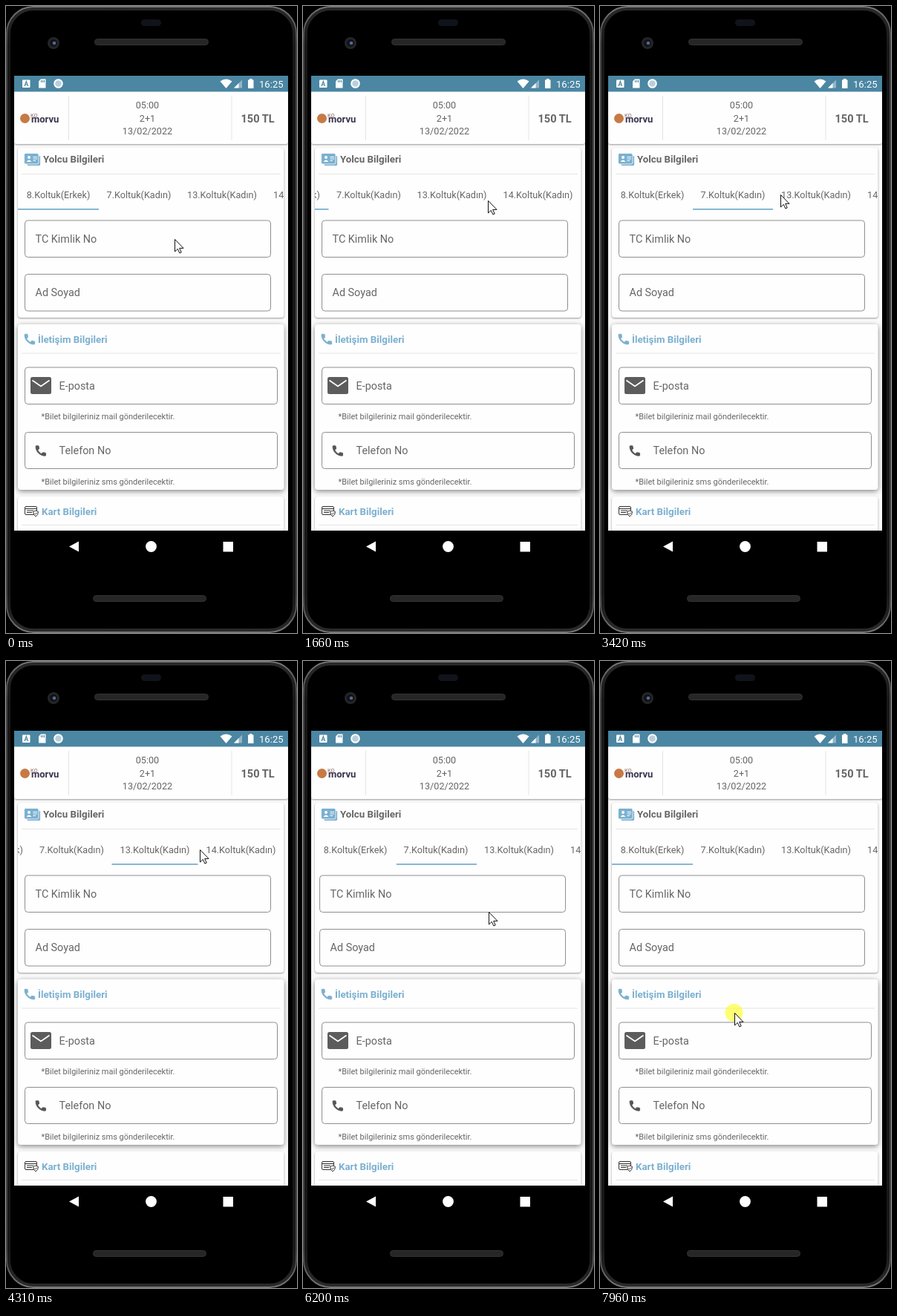
These frames come from a looping animation (392 by 845 pixels, 8 s). An HTML page:

```html
<!DOCTYPE html>
<html lang="tr">
<head>
<meta charset="utf-8">
<style>
html, body { margin: 0; width: 100%; height: 100%; overflow: hidden; background: #000; }
svg { display: block; width: 392px; height: 845px; font-family: Roboto, sans-serif; }
text { fill: #666; }
.body { font-size: 12.65px; }
.mid { text-anchor: middle; }
.label { font-size: 14.4px; }
.hint { font-size: 11px; }
.title { font-size: 13.3px; font-weight: 700; }
.blue { fill: #7bb0d0; }
.card { fill: #fefefe; filter: drop-shadow(0 1px 1.2px #0006); }
.raised { filter: drop-shadow(0 2px 3.5px #0007); }
.field { fill: none; stroke: #8e8e8e; }
.rule { stroke: #e4e4e4; }
.white, .white text { fill: #fff; }
</style>
</head>
<body>
<svg viewBox="0 0 392 845">
  <defs>
    <linearGradient id="rim" x2="0" y2="1">
      <stop offset="0" stop-color="#777"/><stop offset=".06" stop-color="#444"/>
      <stop offset=".94" stop-color="#444"/><stop offset="1" stop-color="#777"/>
    </linearGradient>
    <clipPath id="screen"><rect x="11" y="94" width="369" height="613"/></clipPath>
    <clipPath id="tabClip"><rect x="16" y="230" width="358.5" height="46"/></clipPath>
    <clipPath id="pageClip"><rect x="16" y="280" width="350" height="138"/></clipPath>
    <path id="phone" stroke-width="1.2" d="M6.62 10.79c1.44 2.83 3.76 5.14 6.59 6.59l2.2-2.2c.27-.27.67-.36 1.02-.24 1.12.37 2.33.57 3.57.57.55 0 1 .45 1 1V20c0 .55-.45 1-1 1-9.39 0-17-7.61-17-17 0-.55.45-1 1-1h3.5c.55 0 1 .45 1 1 0 1.25.2 2.45.57 3.57.11.35.03.74-.25 1.02z"/>
  </defs>

  <!-- Phone body -->
  <rect x="1" y="1" width="390" height="843" rx="36" stroke="url(#rim)" stroke-width="2"/>
  <rect x="4" y="4" width="384" height="837" rx="33" fill="none" stroke="url(#rim)" stroke-width="4" opacity=".35"/>
  <rect x="182" y="18" width="27" height="9" rx="4.5" fill="#10131a"/>
  <g fill="#262626" stroke="#333">
    <rect x="119.5" y="44.5" width="153" height="8" rx="4"/>
    <rect x="117.5" y="794.5" width="152" height="8" rx="4"/>
  </g>
  <circle cx="64" cy="50" r="8" fill="#252525"/><circle cx="64" cy="50" r="5" fill="#10131d"/>
  <circle cx="65" cy="50" r="2.3" fill="#59658f"/>
  <g class="white">
    <path d="M85 728.5L98 721.5V735.5Z"/><circle cx="195.500" cy="728.5" r="7.400"/>
    <rect x="292.500" y="722" width="13.500" height="13.500"/>
  </g>

  <g clip-path="url(#screen)">
    <rect x="11" y="94" width="369" height="613" fill="#fafafa"/>
    <rect class="card" x="11" y="112" width="369" height="74" rx="3"/>

    <!-- Status bar -->
    <rect x="11" y="94" width="369" height="21.5" fill="#4b86a3"/>
    <g class="white">
      <rect x="22" y="99.5" width="10.5" height="10.5" rx="1"/>
      <path d="M25 108L27.300 101.500 29.600 108M25.800 106H28.800" fill="none" stroke="#4b86a3" stroke-width="1.2"/>
      <path d="M47 98.500H53.500V110.500H44V101.500Z"/>
      <path d="M47.500 100V103M49.500 100V103M51.500 100V103" stroke="#4b86a3"/>
      <circle cx="70.500" cy="104.500" r="5.300" fill="#b9d0dc" stroke="#fff" stroke-width="2"/>
      <path d="M288.500 101.500Q296.500 95.500 304.500 101.500L296.500 111Z"/>
      <path d="M307 110.500L318 99.500V110.500Z" opacity=".4"/><path d="M307 110.500L313.500 104V110.500Z"/>
      <path d="M326 99.500H328V98H331.500V99.500H333.500V111H326Z"/>
      <text x="341" y="109.500" font-size="13.1">16:25</text>
    </g>

    <!-- Trip header -->
    <path class="rule" d="M84.500 121V181M304 121V181"/>
    <circle cx="25.500" cy="151.500" r="6.500" fill="#c77a45"/>
    <text x="33" y="150" font-size="7.5" style="fill:#8a6a68">KO</text>
    <text x="34" y="156.500" font-size="13" font-weight="700" style="fill:#37344d">morvu</text>
    <g class="body mid">
      <text x="190.500" y="138">05:00</text><text x="190.500" y="156">2+1</text>
      <text x="190.500" y="173">13/02/2022</text>
    </g>
    <text x="316.500" y="157" font-size="14.6" font-weight="700">150 TL</text>

    <!-- Passenger card -->
    <rect class="card" x="16" y="191" width="358.500" height="229" rx="4"/>
    <g class="blue" stroke="#fff" stroke-width=".8">
      <rect x="28" y="201.500" width="18.500" height="14" rx="2"/>
      <rect x="24.500" y="198.500" width="19.500" height="14.500" rx="2"/>
    </g>
    <g class="white">
      <circle cx="31" cy="204" r="2"/><path d="M27.500 210Q31 205 34.500 210Z"/>
      <path d="M36.500 203.500H42M36.500 206H42M36.500 208.500H40" stroke="#fff"/>
    </g>
    <text class="title" x="50" y="211">Yolcu Bilgileri</text>
    <path class="rule" d="M21 226.500H370"/>
    <g clip-path="url(#tabClip)">
      <g id="tabs" class="body mid"></g>
    </g>
    <g clip-path="url(#pageClip)"><g id="pages"></g></g>

    <!-- Contact card -->
    <rect class="card raised" x="16" y="429" width="358.500" height="223" rx="4"/>
    <use href="#phone" class="blue" stroke="#7bb0d0" transform="translate(22.700 440) scale(.76)"/>
    <text class="title blue" x="43" y="454">İletişim Bilgileri</text>
    <path class="rule" d="M21 468H370"/>
    <rect class="field" x="25.500" y="487" width="340" height="49.500" rx="4"/>
    <rect x="33" y="500" width="28" height="23" rx="2.500" fill="#5c5c5c"/>
    <path d="M35.500 504.500L47 512.500 58.500 504.500" fill="none" stroke="#fff" stroke-width="1.8"/>
    <text class="label" x="71.500" y="516.500">E-posta</text>
    <text class="hint" x="47.500" y="557">*Bilet bilgileriniz mail gönderilecektir.</text>
    <rect class="field" x="25.500" y="574.500" width="340" height="49" rx="4"/>
    <use href="#phone" fill="#555" stroke="#555" transform="translate(37.800 590.500) scale(.75)"/>
    <text class="label" x="71.500" y="604">Telefon No</text>
    <text class="hint" x="47.500" y="645">*Bilet bilgileriniz sms gönderilecektir.</text>

    <!-- Payment card -->
    <rect class="card" x="16" y="661" width="358.500" height="60" rx="4"/>
    <g fill="none" stroke="#333">
      <rect x="25.500" y="674.500" width="16" height="11" rx="1.500"/>
      <path d="M26 677.500H41M28 680H37M28 682.500H35"/>
      <path d="M36.500 681.500L40 680 43.500 681.500Q43.500 686 40 688 36.500 686 36.500 681.500Z" fill="#fff"/>
      <path d="M38.300 683.800L39.600 685.200 41.800 682.700"/>
    </g>
    <text class="title blue" x="48" y="686">Kart Bilgileri</text>
    <path class="rule" d="M21 699.500H370"/>
  </g>

  <g id="cursor">
    <circle id="press" r="12" cx="-.5" fill="#ff0" opacity=".55"/>
    <path d="M.5.500V17L4.300 13.400 6.900 19 9.200 18 6.700 12.400H12Z" fill="#fff" stroke="#111"/>
  </g>
</svg>

<script>
const DURATION = 8000, STEP = 70.5, SETTLE = 330, TAP = 110;
const PAGE_WIDTH = 350, VIEW_LEFT = 16, VIEW_RIGHT = 374.5;
const tabLabels = ['8.Koltuk(Erkek)', '7.Koltuk(Kadın)', '13.Koltuk(Kadın)', '14.Koltuk(Kadın)'];
const tabEdges = [16, 125, 233, 349, 465];
const maxScroll = tabEdges[4] - VIEW_RIGHT;
const $ = id => document.getElementById(id);

const lerp = (a, b, u) => a + (b - a) * u;
const clamp = (v, low, high) => Math.max(low, Math.min(high, v));
const smooth = u => u * u * (3 - 2 * u);
const easeIn = u => u ** 3;
const easeOut = u => u * (2 - u);

// A drag without a page scrolls the tab strip; with one it swipes the pager.
const drag = (start, end, from, to, page) => ({ start, end, from, to, page });
const tap = (start, x, y, page) => drag(start, start + TAP, [x, y], [x, y], page);
const hover = (time, x, y) => drag(time, time, [x, y], [x, y]);

const gestures = [
  hover(0, 227, 314),
  hover(420, 116, 247),
  drag(920, 1270, [225, 262], [134, 266]),
  hover(1620, 249, 262),
  hover(2020, 360, 256),
  tap(2540, 85, 250, 1),
  hover(3350, 243, 254),
  tap(3490, 243, 254, 2),
  hover(4240, 243, 254),
  tap(4410, 305, 254, 3),
  drag(4890, 5118, [255, 330], [400, 335], 2),
  drag(5640, 5840, [190, 327], [300, 332], 1),
  drag(6160, 6934, [249, 338], [344, 353], 0),
  hover(7540, 137, 365),
  tap(7890, 181, 474, 0)
];

function stateAt(t) {
  const started = gestures.filter(g => g.start <= t);
  let page = 0, scroll = 0, x, y;
  for (const g of started) {
    const u = easeIn(clamp((t - g.start) / (g.end - g.start || 1), 0, 1));
    [x, y] = g.from.map((v, i) => lerp(v, g.to[i], u));
    const moved = x - g.from[0];
    if (g.page === undefined) {
      scroll = clamp(scroll - moved, 0, maxScroll);
    } else {
      const settled = easeOut(clamp((t - g.end) / SETTLE, 0, 1));
      page = lerp(page - moved / PAGE_WIDTH, g.page, settled);
      scroll = lerp(scroll, 0, settled);
    }
  }
  const last = started[started.length - 1], next = gestures[started.length];
  const pressed = t < last.end;
  if (!pressed && next) {
    const u = smooth((t - last.end) / (next.start - last.end));
    [x, y] = last.to.map((v, i) => lerp(v, next.from[i], u));
  }
  return { page, scroll, x, y, pressed };
}

function edgeAt(position) {
  const i = clamp(Math.floor(position), 0, 3);
  return lerp(tabEdges[i], tabEdges[i + 1], position - i);
}

const field = (y, height, label) => `
  <rect class="field" x="25.5" y="${y}" width="331" height="${height}" rx="4"/>
  <text class="label" x="39.5" y="${y + height / 2 + 5}">${label}</text>`;

$('tabs').innerHTML = tabLabels.map((label, i) =>
  `<text x="${(tabEdges[i] + tabEdges[i + 1]) / 2}" y="258.5">${label}</text>`).join('') +
  '<rect id="indicator" class="blue" y="273" height="1.8"/>';

// The last page has a slightly lower second field.
$('pages').innerHTML = tabLabels.map((_, i) =>
  `<g transform="translate(${i * PAGE_WIDTH})">
    ${field(289, 49.5, 'TC Kimlik No')}${field(361.5, i < 3 ? 49.5 : 44.5, 'Ad Soyad')}
  </g>`).join('');

function draw(t) {
  const { page, scroll, x, y, pressed } = stateAt(t);
  const left = edgeAt(page), right = edgeAt(page + 1);
  const centred = (left + right - VIEW_LEFT - VIEW_RIGHT) / 2;
  const offset = clamp(Math.max(scroll, centred), 0, maxScroll);

  $('tabs').setAttribute('transform', `translate(${-offset})`);
  $('indicator').setAttribute('x', left);
  $('indicator').setAttribute('width', right - left);
  $('pages').setAttribute('transform', `translate(${-page * PAGE_WIDTH})`);
  $('cursor').setAttribute('transform', `translate(${Math.round(x)} ${Math.round(y)})`);
  $('press').style.display = pressed ? '' : 'none';
}

const start = performance.now();
function frame() {
  const t = (performance.now() - start) % DURATION;
  draw(Math.floor(t / STEP) * STEP);
  requestAnimationFrame(frame);
}
frame();
</script>
</body>
</html>
```
